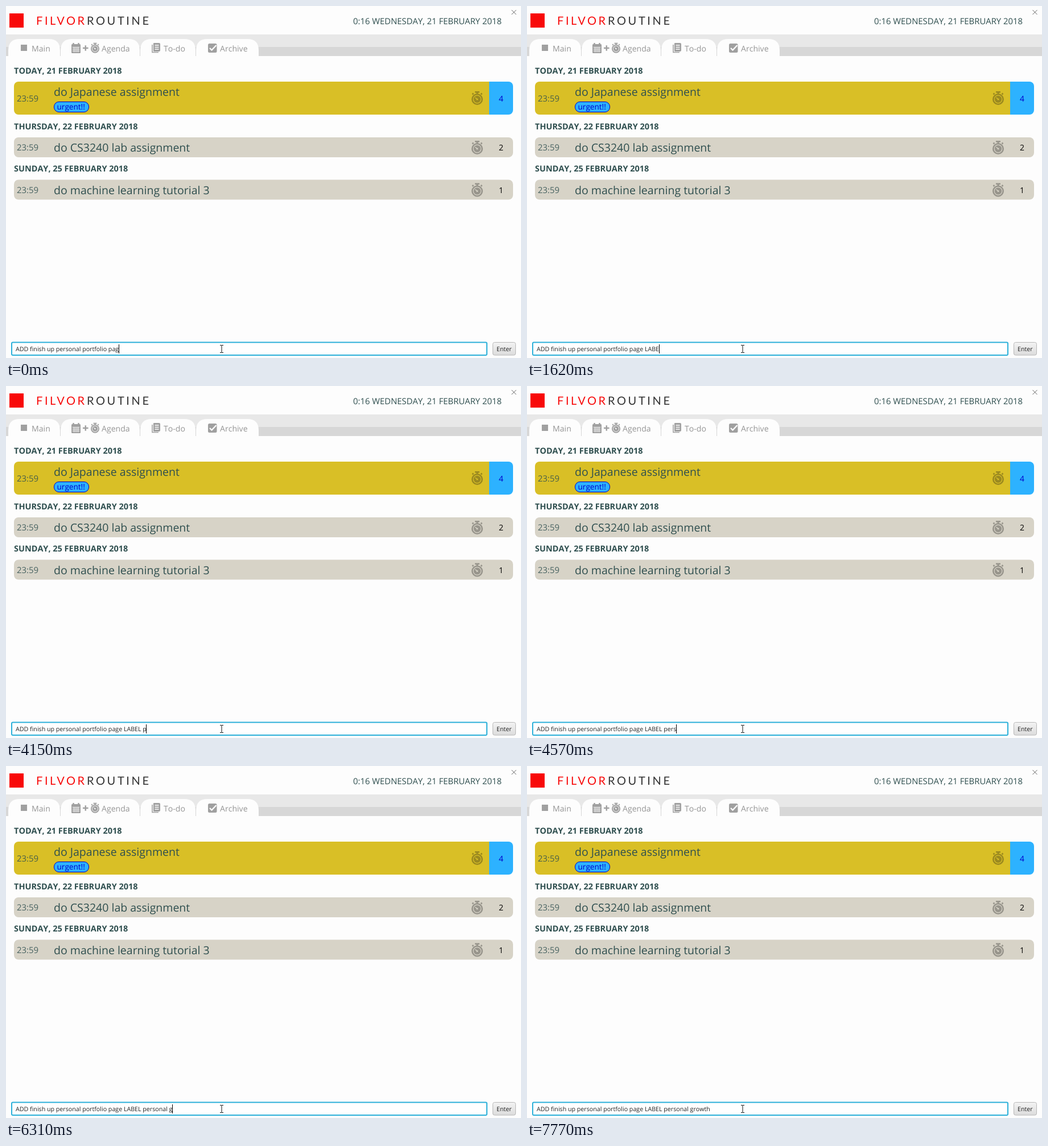
Recreate the animation shown at these times as an HTML page. Size 905 by 619 pixels, loop 8000 ms.

```html
<!DOCTYPE html>
<html lang="en">
<head>
<meta charset="utf-8">
<title>Planner</title>
<style>
  html, body { margin: 0; width: 100%; height: 100%; overflow: hidden; background: #fdfdfd; }
  svg { display: block; }
  text {
    font-family: "Open Sans", "Noto Sans", sans-serif;
    font-kerning: none;
    text-rendering: geometricPrecision;
    white-space: pre;
    fill: #2f4f4f;
  }
  .brand { font: 20px Lato, sans-serif; letter-spacing: 3.6px; }
  .date { font-size: 14.86px; }
  .tab { font-size: 14.1px; fill: #959595; }
  .day { font-size: 14.47px; font-weight: 700; }
  .task { font-size: 19.5px; }
  .time { font-size: 14.9px; opacity: .85; }
  .count { font-size: 14px; text-anchor: middle; fill: #000; }
  .label { font-size: 13.6px; }
  .small { font-size: 10.66px; fill: #222; }
  .blue { fill: #0000cd; }
  .icon { color: #a0a0a0; --hole: #fdfdfd; }
  .gold { color: #9b891f; --hole: #d9bf26; }
  .sand { color: #98958c; --hole: #d7d3c7; }
</style>
</head>
<body>
<svg width="905" height="619" viewBox="0 0 905 619">
  <defs>
    <linearGradient id="face" x2="0" y2="1">
      <stop stop-color="#f3f3f3"/><stop offset="1" stop-color="#dcdcdc"/>
    </linearGradient>
    <clipPath id="card"><rect x="14" y="133" width="877" height="58" rx="8"/></clipPath>
    <g id="watch" fill="currentColor" stroke="currentColor">
      <path d="M-4-12.5h8v2.500h-8zM-1.500-10h3v2h-3z" stroke="none"/>
      <path d="M-8.500-7l2-2M8.500-7l-2-2" stroke-width="2.500"/>
      <circle cy="1.500" r="8.700" fill="none" stroke-width="2.600"/>
      <circle cy="1.500" r="6.200" stroke="none"/>
      <path d="M-3.500-1.500L0 1.500" style="stroke:var(--hole)" stroke-width="1.300"/>
      <circle cy="1.500" r="1.500" style="fill:var(--hole)" stroke="none"/>
    </g>
  </defs>

  <rect width="905" height="619" fill="#fdfdfd"/>
  <rect x="6" y="13" width="25" height="25" fill="#f80808"/>
  <text class="brand" x="53" y="33" style="fill:#f80808">FILVOR</text>
  <text class="brand" x="142" y="33" style="fill:#333">ROUTINE</text>
  <text class="date" x="610" y="32">0:16 WEDNESDAY, 21 FEBRUARY 2018</text>
  <path d="M888.500 7l8 8m0-8l-8 8" stroke="#666" fill="none"/>

  <rect y="50" width="905" height="22" fill="#e8e8e8"/>
  <rect y="72" width="905" height="16" fill="#d7d7d7"/>
  <g id="tabs" fill="#fdfdfd"></g>

  <g class="icon" fill="currentColor">
    <rect x="26" y="68" width="11" height="11"/>
    <rect x="115" y="67" width="16" height="16" rx="1.500"/>
    <path d="M118.500 65v4m9-4v4" stroke="currentColor" stroke-width="2.500"/>
    <path d="M116.500 72.500h13m-13 3.300h13m-13 3.300h13M119.700 72v9.500m3.400-9.500v9.500m3.400-9.500v9.500" stroke="#fdfdfd" stroke-width=".9"/>
    <path d="M135 74h9.500M139.750 69.250v9.500" stroke="currentColor" stroke-width="2.400"/>
    <use href="#watch" transform="translate(156.500 74) scale(.75)"/>
    <path d="M260 65h9a2 2 0 0 1 2 2v11a2 2 0 0 1-2 2h-9a1 1 0 0 1-1-1V66a1 1 0 0 1 1-1z"/>
    <path d="M257 68v13.500h11" fill="none" stroke="currentColor" stroke-width="1.600"/>
    <path d="M261.500 69h7m-7 3.500h7m-7 3.500h7" stroke="#fdfdfd" stroke-width="1.300"/>
    <rect x="355" y="66" width="15.500" height="16" rx="2.500"/>
    <path d="M358 74l3.500 3.500 8-8.500" fill="none" stroke="#fdfdfd" stroke-width="2.300"/>
  </g>

  <text class="day" x="14" y="118.500">TODAY, 21 FEBRUARY 2018</text>
  <g clip-path="url(#card)">
    <rect x="14" y="133" width="835" height="58" fill="#d9bf26"/>
    <rect x="849" y="133" width="42" height="58" fill="#2db2ff"/>
  </g>
  <text class="time" x="19" y="168">23:59</text>
  <text class="task" x="84" y="158">do Japanese assignment</text>
  <rect x="84.500" y="168.500" width="61" height="18" rx="8.500" fill="#2db2ff" stroke="#0000cd"/>
  <text class="label blue" x="89.500" y="182">urgent!!</text>
  <use class="gold" href="#watch" x="828" y="162.500"/>
  <text class="count" x="870" y="168" style="fill:#0000cd">4</text>

  <text class="day" x="14" y="216.500">THURSDAY, 22 FEBRUARY 2018</text>
  <rect x="14" y="231" width="877" height="35" rx="8" fill="#d7d3c7"/>
  <text class="time" x="19" y="254">23:59</text>
  <text class="task" x="84" y="256">do CS3240 lab assignment</text>
  <use class="sand" href="#watch" x="828" y="249.500"/>
  <text class="count" x="870" y="254">2</text>

  <text class="day" x="14" y="291">SUNDAY, 25 FEBRUARY 2018</text>
  <rect x="14" y="305.500" width="877" height="35" rx="8" fill="#d7d3c7"/>
  <text class="time" x="19" y="329">23:59</text>
  <text class="task" x="84" y="330.500">do machine learning tutorial 3</text>
  <use class="sand" href="#watch" x="828" y="324"/>
  <text class="count" x="870" y="329">1</text>

  <rect x="10" y="591.500" width="835" height="22.500" rx="2" fill="#fff" stroke="#2cb0d9" stroke-width="2"/>
  <text id="entry" class="small" x="17" y="607" xml:space="preserve"></text>
  <rect id="caret" y="595" width="1" height="16" fill="#000"/>
  <path d="M376 596.500h2.500l.5.500.5-.5h2.500M376 609.500h2.500l.5-.5.5.500h2.500M379 597v12" fill="none" stroke="#111"/>
  <rect x="855.500" y="591.500" width="40" height="22.500" rx="3" fill="url(#face)" stroke="#b8b8b8"/>
  <text class="small" x="862" y="607">Enter</text>
</svg>
<script>
  const LOOP = 8000;
  const MESSAGE = "ADD finish up personal portfolio page LABEL personal growth";
  const KEYS = [20, 430, 990, 1110, 1380, 1620, 1770, 3910, 4150, 4270, 4420, 4490,
    4630, 4820, 4940, 5090, 5930, 6310, 6580, 6670, 6810, 7150, 7280];
  const CARET_OFF = [[2270, 2770], [3260, 3750], [5870, 5930], [7770, LOOP]];
  const TABS = [["Main", 4, 95, 45], ["Agenda", 96, 235, 168], ["To-do", 236, 333, 277], ["Archive", 334, 444, 376]];

  const tabShape = ([name, left, right, textX]) =>
    `<path d="M${left} 88V78Q${left} 58 ${left + 20} 58H${right - 20}Q${right} 58 ${right} 78V88z"/>
     <text class="tab" x="${textX}" y="79.500">${name}</text>`;
  document.getElementById("tabs").innerHTML = TABS.map(tabShape).join("");

  const entry = document.getElementById("entry");
  const caret = document.getElementById("caret");
  const start = performance.now();

  function draw() {
    const t = (performance.now() - start) % LOOP;
    const typed = KEYS.filter(key => key <= t).length;
    entry.textContent = MESSAGE.slice(0, MESSAGE.length - KEYS.length + typed);
    caret.setAttribute("x", Math.round(16.5 + entry.getComputedTextLength()));
    const hidden = CARET_OFF.some(([from, to]) => t >= from && t < to);
    caret.setAttribute("visibility", hidden ? "hidden" : "visible");
    requestAnimationFrame(draw);
  }
  draw();
</script>
</body>
</html>
```
